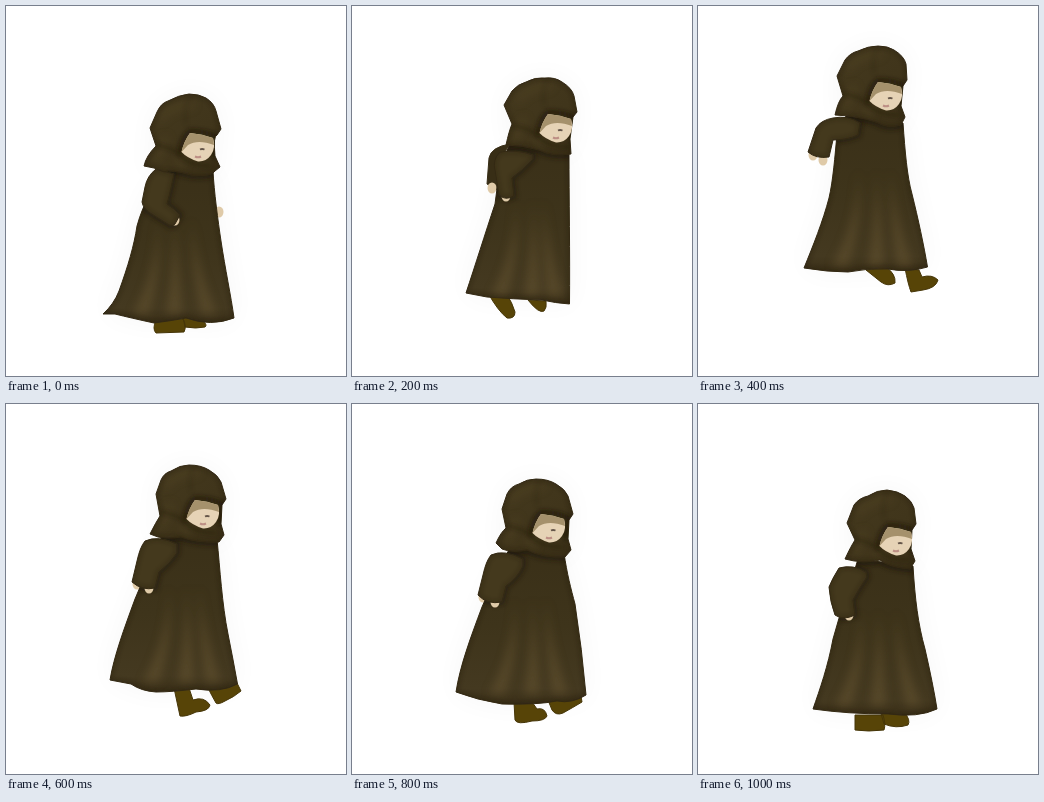
Write an HTML page that moves like this. It is 340 px wide and 370 px high and loops after 1200 ms.

```html
<!DOCTYPE html>
<html lang="en">
<head>
<meta charset="utf-8">
<title>Hooded walker</title>
<style>
html, body { margin: 0; width: 100%; height: 100%; overflow: hidden; background: #fff; }
svg { display: block; }
.cloth { stroke: #372d16; stroke-width: 1; stroke-linejoin: round; }
.edge { fill: none; stroke: #1d1608; stroke-width: 4; opacity: .3; filter: url(#soft2); }
.light { fill: none; stroke: #64532f; stroke-linecap: round; filter: url(#soft5); }
.dark { fill: none; stroke: #1e1708; stroke-linecap: round; filter: url(#soft2); }
.skin { fill: #dfcaa8; }
</style>
</head>
<body>
<svg width="340" height="370" viewBox="0 0 340 370">
  <defs>
    <filter id="soft2" filterUnits="userSpaceOnUse" x="0" y="0" width="340" height="370"><feGaussianBlur stdDeviation="2"/></filter>
    <filter id="soft5" filterUnits="userSpaceOnUse" x="0" y="0" width="340" height="370"><feGaussianBlur stdDeviation="5"/></filter>
    <filter id="halo" filterUnits="userSpaceOnUse" x="0" y="0" width="340" height="370"><feGaussianBlur stdDeviation="14"/></filter>
    <linearGradient id="robeFill" x1="0" y1="0" x2="0" y2="1">
      <stop offset="0" stop-color="#3a3018"/>
      <stop offset=".5" stop-color="#3e341b"/>
      <stop offset=".9" stop-color="#443920"/>
      <stop offset="1" stop-color="#3a2f18"/>
    </linearGradient>
    <linearGradient id="hoodFill" x1="0" y1="0" x2="1" y2="1">
      <stop offset="0" stop-color="#44391e"/>
      <stop offset=".6" stop-color="#40351b"/>
      <stop offset="1" stop-color="#3b3017"/>
    </linearGradient>
    <clipPath id="robeClip"><path data-d="robe"/></clipPath>
    <clipPath id="hoodClip"><path data-d="hood"/></clipPath>
    <clipPath id="armClip"><path data-d="arm"/></clipPath>
  </defs>

  <path data-d="robe" fill="#000" opacity=".035" filter="url(#halo)"/>
  <path data-d="hood" fill="#000" opacity=".035" filter="url(#halo)"/>
  <path data-d="shoes" fill="#574407" stroke="#453508"/>
  <path data-d="backArm" class="cloth" fill="#382e16"/>
  <g class="skin" id="backHands"></g>

  <path data-d="robe" class="cloth" fill="url(#robeFill)"/>
  <g clip-path="url(#robeClip)">
    <path data-d="folds" fill="#665431" opacity=".55" filter="url(#soft5)"/>
    <path data-d="hood" class="dark" stroke-width="8" opacity=".5"/>
    <path data-d="arm" class="dark" stroke-width="6" opacity=".5"/>
    <path data-d="robe" class="edge"/>
  </g>

  <g class="skin" id="frontHands"></g>
  <path data-d="arm" class="cloth" fill="#44391d"/>
  <g clip-path="url(#armClip)"><path data-d="arm" class="edge"/></g>

  <path data-d="hood" class="cloth" fill="url(#hoodFill)"/>
  <g clip-path="url(#hoodClip)">
    <g class="head">
      <path class="light" d="M155 112Q166 99 185 99" stroke-width="8" opacity=".25"/>
      <path class="light" d="M160 132L151 154M174 150L176 164" stroke-width="5" opacity=".35"/>
      <path class="dark" d="M151 139Q164 141 173 148Q182 160 205 160" stroke-width="3" opacity=".4"/>
      <path class="dark" d="M174 147Q175 132 184 125Q200 125 212 131L208 150" stroke-width="4" opacity=".7"/>
      <path class="dark" d="M184 91Q177 103 180 118" stroke-width="2" opacity=".2"/>
    </g>
    <path data-d="hood" class="edge"/>
  </g>

  <g class="head">
    <path d="M184 127Q196 128 207 132Q210 142 205 149Q200 156 192 155.500Q181 152 175.500 146Q178 135 184 127Z" fill="#e6d3b6"/>
    <path d="M184 127Q196 128 207 132L208 139Q192 133 182 139L175.500 146Q178 135 184 127Z" fill="#a5916c"/>
    <path d="M194 143.500Q196 142.500 198.500 143.500" fill="none" stroke="#65564a" stroke-width="1.800"/>
    <path d="M189 150.500Q192 152 195 150.500" fill="none" stroke="#bd8f85" stroke-width="2"/>
  </g>
</svg>
<script>
const STEP = 200;

// head: offset of the face; hem: [bottom y, fold x...]; hands: [x, y] pairs
const poses = [
  {
    head: [0, 0], hem: [308, 135, 168, 203],
    hood: "M183 88Q193 88 200 92Q208 97 210 105L215 123L211 129Q207 130 209 150L214 161L209 165Q206 171 185 169Q165 163 158 166L148 162L138 160Q140 150 150 140L144 122L151 106Q155 97 162 95Q173 89 183 88Z",
    robe: "M162 162L207 165C208 185 212 215 215 235C219 262 225 290 228 312Q205 321 180 312Q164 315 148 317Q125 312 109 308L97 308Q108 298 113 285C122 260 128 240 131 220C137 198 148 178 162 162Z",
    arm: "M150 163Q141 170 139 181L136 196Q137 203 147 209L163 219Q167 221 169 218L174 209Q168 202 161 198Q164 188 168 168Z",
    shoes: "M150 314L177 313Q181 320 178 326L150 327Q146 323 150 314ZM177 311L196 314Q202 319 199 321Q190 323 179 321Z",
    back: [[213, 206]], front: [[169, 214]]
  },
  {
    head: [12, -19], hem: [290, 147, 180, 203],
    hood: "M193 72Q203 71 210 76Q220 82 222 90L225 106L221 111L218 133L219 148Q200 151 187 144Q170 139 154 139Q157 125 160 118L152 99L160 85Q166 78 174 76Q183 71 193 72Z",
    robe: "M158 138L217 146C217 190 218 250 217.500 298Q203 297 190 294Q160 293 135 291L114 287C123 260 133 228 143 198L148 160Z",
    arm: "M181 149Q165 143 148 146Q140 153 143 165L147 189Q153 195 162 190L160 172Q170 165 181 153Z",
    backArm: "M158 138Q139 141 137 152L135 178L145 184L150 150Z",
    shoes: "M136 287L155 289Q160 296 163 306Q163 313 155 312Q146 305 136 287ZM176 294L194 295Q195 302 192 305Q187 308 176 294Z",
    back: [[140, 182]], front: [[154, 190]]
  },
  {
    head: [-4, -51], hem: [260, 142, 178, 207],
    hood: "M180 40Q190 40 196 44Q206 50 208 58L209 74L205 80L203 100L207 111L203 119Q190 123 178 116Q160 110 137 109Q140 95 145 90L139 70L147 54Q152 47 160 45Q170 40 180 40Z",
    robe: "M148 110L205 117C207 145 209 170 214 188C220 212 226 240 229.500 261Q210 267 190 263Q170 262 150 266Q130 266 106 262C115 240 125 215 131 192C135 175 137 150 139 128Z",
    arm: "M162 117Q150 109 135 112Q123 114 118 122L110 146Q118 153 131 151L135 134Q150 134 160 129Z",
    shoes: "M168 264L188 261Q198 268 197 277Q190 281 183 276ZM207 262L221 264L224 271Q234 268 240 274Q238 282 225 284L213 286Q210 278 207 262Z",
    back: [[115, 149]], front: [[125, 154]]
  },
  {
    head: [5, -31], hem: [278, 145, 180, 207],
    hood: "M183 61Q195 61 203 66Q212 71 215 78L220 95L216 101L215 120L218 131L213 138Q190 139 175 133Q160 135 152 133L144 130Q150 118 154 112L150 90L155 76Q158 69 165 67Q174 61 183 61Z",
    robe: "M157 130L211 135C214 165 216 200 222 230Q227 255 231.500 280Q215 289 190 285Q165 288 150 288Q135 287 125 280L104 276C108 252 118 225 129 195L148 150Z",
    arm: "M171 140Q152 131 139 137Q134 143 131 157L126 178Q136 187 149 184L153 168Q164 160 171 149Z",
    shoes: "M168 284L183 284L187 296Q198 292 204 301Q203 307 190 308Q180 313 174 312ZM202 284L231 279L235 287Q228 293 219 297Q212 301 210 299Q206 292 202 284Z",
    back: [[131, 180]], front: [[143, 184]]
  },
  {
    head: [5, -17], hem: [290, 145, 180, 208],
    hood: "M184 75Q196 75 204 80Q213 85 216 92L221 110L217 116L216 135L219 146L213 153Q190 154 175 146Q160 149 150 145L144 139Q149 128 154 124L150 105L155 90Q159 82 167 80Q175 75 184 75Z",
    robe: "M158 144L212 149C215 170 219 185 223 200Q230 245 234 291Q220 300 205 297Q185 301 150 300Q125 296 104 288C108 262 118 235 130 203L148 162Z",
    arm: "M171 155Q152 145 139 151Q134 157 131 171L126 191Q135 201 150 198L154 182Q165 175 171 162Z",
    shoes: "M162 298L180 298L185 305Q193 303 195 312Q193 317 180 317Q165 321 163 316ZM196 296L229 292L230 298Q220 304 211 309Q204 312 200 306Z",
    back: [[131, 193]], front: [[143, 198]]
  },
  {
    head: [6, -4], hem: [302, 145, 180, 216],
    hood: "M189 86Q200 87 207 92Q214 97 216 104L218 120L214 126L213 145L217 157L212 165Q190 163 182 156Q165 160 147 155Q153 142 157 136L149 119L156 101Q161 94 170 92Q179 86 189 86Z",
    robe: "M160 155L215 162C217 195 220 220 227 245Q235 280 239 305Q220 314 190 310Q150 310 115 305C122 285 130 262 135 235Q140 215 148 195Z",
    arm: "M168 168Q155 160 141 164Q134 175 131 183Q132 198 137 211Q145 217 157 211L155 196Q161 185 169 173Z",
    shoes: "M157 311L185 311Q188 320 186 326Q170 328 157 326ZM182 306L206 308Q213 316 210 321Q198 325 186 320Z",
    back: [], front: [[151, 211]]
  }
];

const all = sel => [...document.querySelectorAll(sel)];
const parts = all("[data-d]");
const heads = all(".head");
const backHands = document.getElementById("backHands");
const frontHands = document.getElementById("frontHands");

const hands = list => list
  .map(([x, y]) => `<ellipse cx="${x}" cy="${y}" rx="4.500" ry="5.500"/>`).join("");

// Folds taper from the waist and fan out towards the hem.
function fan([y, ...xs]) {
  const mid = xs[1];
  return xs.map(x => {
    const top = mid + (x - mid) * 0.5;
    return `M${top} ${y - 95}Q${top} ${y - 45} ${x - 8} ${y}H${x + 8}Q${top + 5} ${y - 45} ${top} ${y - 95}Z`;
  }).join("");
}

for (const p of poses) p.folds = fan(p.hem);

let shown = -1;
function show(i) {
  if (i === shown) return;
  shown = i;
  const p = poses[i];
  for (const el of parts) el.setAttribute("d", p[el.dataset.d] || "");
  for (const el of heads) el.setAttribute("transform", `translate(${p.head})`);
  backHands.innerHTML = hands(p.back);
  frontHands.innerHTML = hands(p.front);
}

const start = performance.now();
function tick() {
  show(Math.floor((performance.now() - start) / STEP) % poses.length);
  requestAnimationFrame(tick);
}
tick();
</script>
</body>
</html>
```
